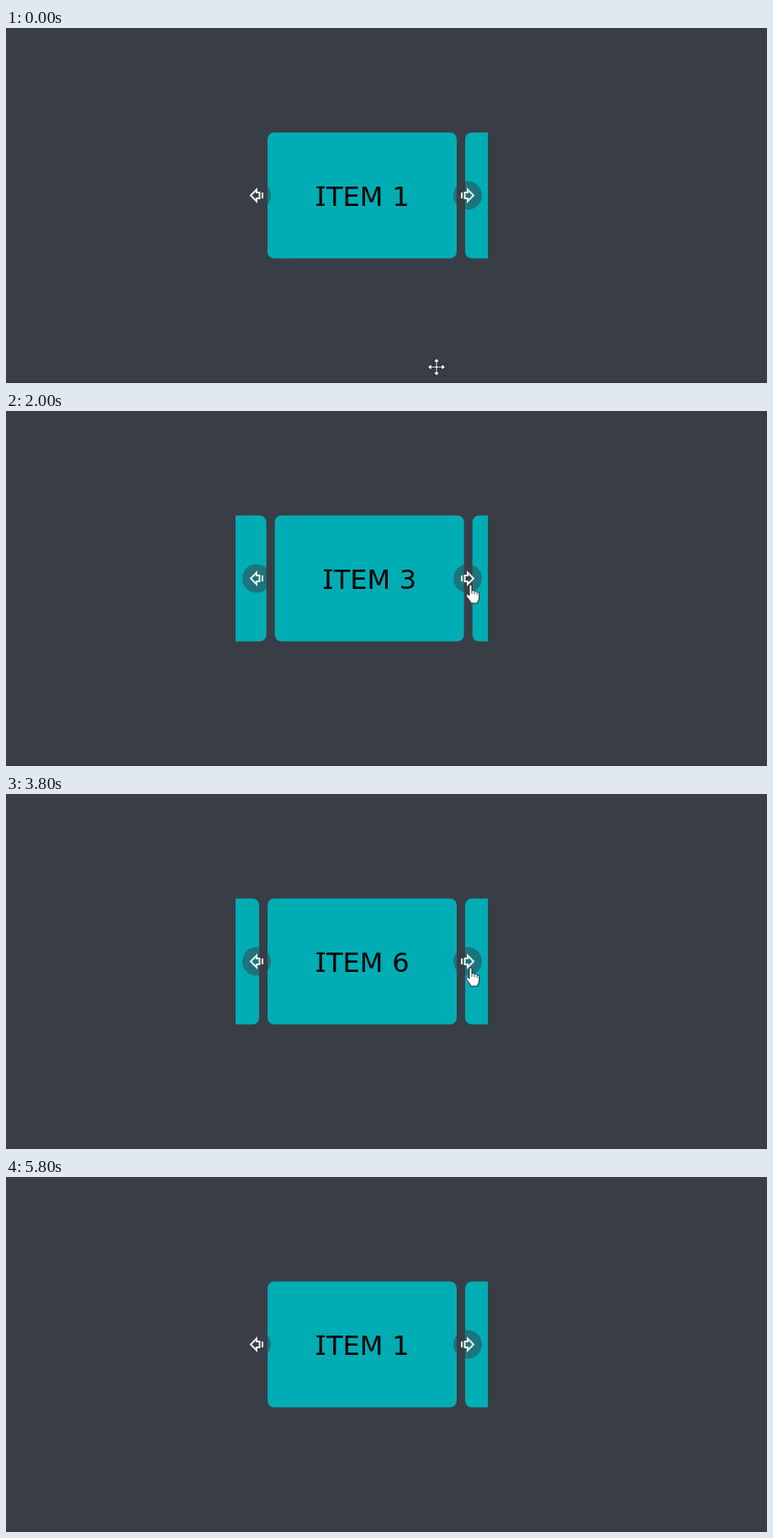
These frames come from a looping animation (905 px wide and 423 px high, 6200 ms). An HTML page:

```html
<!DOCTYPE html>
<html lang="en">
<head>
<meta charset="utf-8">
<title>Carousel</title>
<style>
html, body { margin: 0; width: 100%; height: 100%; overflow: hidden; background: #393e46; }
svg { display: block; width: 100vw; height: 100vh; }
text { font: 32px "DejaVu Sans", Verdana, sans-serif; }
</style>
</head>
<body>
<svg viewBox="0 0 905 423">
  <defs>
    <clipPath id="view"><rect x="273" y="120" width="300" height="160"/></clipPath>
    <g id="arrow">
      <circle r="17" fill="#393e46" fill-opacity=".5"/>
      <path d="M-7 -3.5V3.5M-3.5 -3.5H0V-7L7 0L0 7V3.5H-3.5Z" fill="none" stroke="#eee" stroke-width="2"/>
    </g>
  </defs>
  <rect width="905" height="423" fill="#393e46"/>
  <rect y="422" width="905" height="1" fill="#38343c"/>
  <g clip-path="url(#view)"><g id="track"></g></g>
  <use href="#arrow" transform="translate(298 199.5) scale(-1 1)"/>
  <use href="#arrow" transform="translate(549 199.5)"/>
  <g id="cursor" stroke="#1c2026" stroke-linejoin="round" fill="#fff">
    <path id="move" stroke-width="1" d="M0 -10.5L4 -6H1V-1H6V-4L10.5 0L6 4V1H1V6H4L0 10.5L-4 6H-1V1H-6V4L-10.5 0L-6 -4V-1H-1V-6H-4Z"/>
    <g id="hand">
      <path stroke-width="1" d="M-2 1.5Q-2 0 -.5 0T1 1.5V7Q3.5 5.8 4.2 7.8Q6.4 6.8 7.2 8.8Q9.8 8 9.8 10.5V15Q9.8 18 8 20V22H-.5V20.5L-5.2 14.2Q-6.6 11.8 -4.8 11.2Q-3.5 11 -2 13Z"/>
      <path fill="none" stroke-width=".8" d="M1 7V11M4.2 8V11.5M7.2 9V12"/>
    </g>
  </g>
</svg>
<script>
const LOOP = 6200, STEP = 100, LAST = 5800;
const COUNT = 8, PITCH = 235, SLIDE = 400;
const BUTTON = { x: 549, y: 199, r: 18 };
const clicks = [1050, 1770, 2320, 2860, 3420, 3970, 4520, 5090];

// pointer hotspot: time, x, y
const path = [
  [0, 512, 404], [700, 548, 284], [950, 553, 199], [1500, 553, 199],
  [2000, 553, 207], [5100, 553, 207], [5200, 553.5, 215.5],
  [5600, 540, 350], [5700, 534, 400], [5800, 528, 450]
];

const $ = id => document.getElementById(id);
const lerp = (a, b, k) => a + (b - a) * k;
const clamp = v => Math.min(1, Math.max(0, v));

function card(i) {
  const x = 311 + i * PITCH;
  return `<g transform="translate(${x} 124.5)">
    <rect width="225" height="150" rx="8" fill="#00adb5"/>
    <path d="M58.3 64.2h9.8v2.4h-9.8zM58.3 85.1h9.8v2.4h-9.8z"/>
    <text y="87.5"><tspan x="58.5">I</tspan><tspan x="70">TEM</tspan> <tspan x="148.2">${i + 1}</tspan></text>
  </g>`;
}

// cubic-bezier(.25, 1, .5, 1)
function ease(x) {
  if (x <= 0 || x >= 1) return clamp(x);
  let lo = 0, hi = 1;
  for (let n = 0; n < 24; n++) {
    const s = (lo + hi) / 2, q = 1 - s;
    if (.75 * s * q * q + 1.5 * s * s * q + s ** 3 < x) lo = s; else hi = s;
  }
  return 1 - (1 - lo) ** 3;
}

function slideAt(t) {
  let pos = 0;
  clicks.forEach((start, i) => {
    pos = lerp(pos, (i + 1) % COUNT, ease((t - start) / SLIDE));
  });
  return pos;
}

function pointerAt(t) {
  const n = Math.max(1, path.findIndex(p => p[0] >= t));
  const a = path[n - 1], b = path[n];
  const k = clamp((t - a[0]) / (b[0] - a[0]));
  return [lerp(a[1], b[1], k), lerp(a[2], b[2], k)];
}

function draw(t) {
  const [x, y] = pointerAt(t);
  const over = Math.hypot(x - BUTTON.x, y - BUTTON.y) < BUTTON.r;
  $("track").setAttribute("transform", `translate(${-slideAt(t) * PITCH} 0)`);
  $("cursor").setAttribute("transform", `translate(${x} ${y})`);
  $("hand").style.display = over ? "" : "none";
  $("move").style.display = over ? "none" : "";
}

$("track").innerHTML = Array.from({ length: COUNT }, (_, i) => card(i)).join("");

const begin = performance.now();
function tick() {
  const t = (performance.now() - begin) % LOOP;
  draw(Math.min(LAST, Math.floor(t / STEP) * STEP));
  requestAnimationFrame(tick);
}
draw(0);
tick();
</script>
</body>
</html>
```
